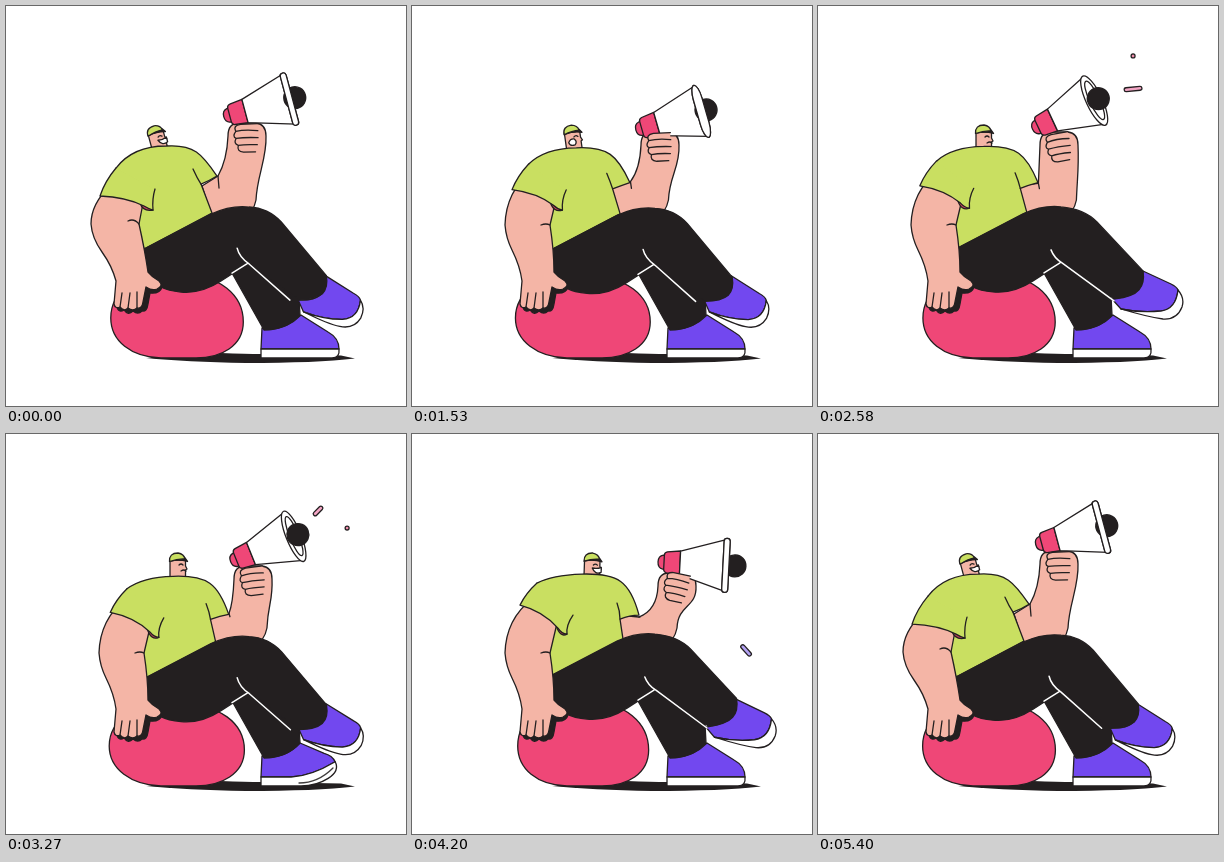
These frames come from a looping animation (400 px wide and 400 px high, 5.43 s). An HTML page:

```html
<!DOCTYPE html>
<html lang="en">
<head>
<meta charset="utf-8">
<title>Megaphone</title>
<style>
html, body { margin: 0; height: 100%; overflow: hidden; background: #fff; }
svg { display: block; width: 100%; height: 100%; }
path, rect, ellipse, circle { stroke: #231f20; stroke-width: 1.3; stroke-linejoin: round; stroke-linecap: round; }
.ink { fill: #231f20; }
.skin { fill: #f4b5a6; }
.green { fill: #c9df61; }
.pink { fill: #ef4777; }
.purple { fill: #7248ef; }
.white { fill: #fff; }
.line { fill: none; }
#shadow { stroke: none; }
#crease { stroke: #fff; stroke-width: 1.5; }
</style>
</head>
<body>
<svg viewBox="0 0 400 400">
  <path id="shadow" class="ink" d="M140 352L215 347Q240 348 255 348L335 349.500L349 352.500Q310 357 240 357Q180 356 140 352Z"/>
  <path id="ball" class="pink"/>
  <path id="shoe" class="purple"/>
  <path id="sole" class="white"/>
  <path id="soleLine" class="line" d="M293 349Q312 349 327 334"/>
  <path class="ink" d="M226 267L246 252L293 290L294 309Q280 324 258 324Z"/>
  <path id="farArm" class="skin"/>
  <path id="elbow" class="line"/>
  <g id="horn">
    <path class="pink" d="M-14-7H-17Q-22-6-22 0Q-22 6-17 7H-14Z"/>
    <path class="pink" d="M0-12L-13-10.500Q-16-10-16-7V7Q-16 10-13 10.500L0 12Z"/>
    <path class="white" d="M0-12L46-26V26L0 12Z"/>
    <rect id="rim" class="white"/>
    <ellipse id="mouthRing" class="white" cx="46.500" ry="21"/>
    <circle id="core" class="ink" r="11"/>
    <rect id="frontRim" class="white"/>
  </g>
  <path id="fist" class="skin" d="M9-12H-8Q-16-11-13-5Q-17 0-13 2Q-16 7-11 9Q-13 15-6 16H6M-13-5Q-4-7 9-5M-13 2Q-4 1 9 2M-11 9Q-4 8 8 9"/>
  <g id="head">
    <path class="skin" d="M-8 4V-16H7.500V-10L9-7L7.500-6V4Z"/>
    <path class="line" d="M1-11Q3-13 5-11"/>
    <path id="lips"/>
    <path class="ink" d="M-7-15Q1-17 9.500-14.500L7-18Z"/>
    <path class="green" d="M-8.500-14.500Q-9-23 0-23Q6-22 7-17Q0-17.500-8.500-14.500Z"/>
  </g>
  <path id="torso" class="green"/>
  <path id="pit" class="line"/>
  <path id="foot" class="purple"/>
  <path id="footSole" class="white"/>
  <path id="thigh" class="ink"/>
  <path id="crease" class="line"/>
  <path id="handShade" class="ink"/>
  <path id="arm" class="skin"/>
  <path id="armLine" class="line"/>
  <path id="lining" fill="#c4455c"/>
  <path id="sleeve" class="green"/>
  <g id="sparks"></g>
</svg>
<script>
const LOOP = 5430, STEP = 1810;
const $ = id => document.getElementById(id);
const set = (id, attrs) => { for (const k in attrs) $(id).setAttribute(k, attrs[k]); };
const draw = (id, d) => set(id, { d });
const clamp = x => Math.max(0, Math.min(1, x));
const ease = (t, a, b) => { const k = clamp((t - a) / (b - a)); return k * k * (3 - 2 * k); };
const wave = (t, peak, period) => Math.cos(2 * Math.PI * (t - peak) / period);
const NUM = /-?\d+(\.\d+)?/g;

// Blends two paths that share the same commands.
function mix(a, b, k) {
  const to = b.match(NUM);
  let i = 0;
  return a.replace(NUM, x => (x * (1 - k) + to[i++] * k).toFixed(2));
}

// time, lean, fist x y, horn x y, horn angle, rim width, head x, head angle
const poses = [
  [0, 0, 243, 130, 239, 105, -15, 3, 154, -15],
  [300, .08, 242, 130, 237, 102.5, -16, 3, 154.5, -12],
  [690, .22, 242, 134, 235.5, 107, -16.5, 3, 156, -7],
  [1530, .43, 250, 139, 245, 118, -16, 4.4, 162.5, -8],
  [2150, .5, 243, 136, 234, 111, -25, 7, 164.5, -2],
  [2580, .56, 243, 139, 234.5, 114, -25, 8, 166, 0],
  [3270, .73, 249, 145, 245, 119.5, -22, 7.5, 172, 0],
  [4200, 1, 267, 152, 268, 129, 3, 3, 180, 2],
  [4600, .35, 252, 142, 250, 118, -8, 3, 164, -8],
  [5000, 0, 243, 131, 239, 106, -15, 3, 154, -15]
];
const count = poses.length;
const keyAt = (i, c) => {
  const n = (i + count) % count;
  return poses[n][c] + (c ? 0 : LOOP * Math.floor(i / count));
};
const slope = (i, c) => (keyAt(i + 1, c) - keyAt(i, c)) / (keyAt(i + 1, 0) - keyAt(i, 0));
const tangent = (i, c) => {
  const a = slope(i - 1, c), b = slope(i, c);
  return a * b <= 0 ? 0 : 2 * a * b / (a + b);
};
// Smooth curve through the poses without overshoot.
function poseAt(t) {
  let i = count - 1;
  while (poses[i][0] > t) i--;
  const span = keyAt(i + 1, 0) - keyAt(i, 0), k = (t - keyAt(i, 0)) / span;
  const s = k * k * (3 - 2 * k);
  return poses[i].map((v, c) => v + (keyAt(i + 1, c) - v) * s
    + span * (k * (1 - k) ** 2 * tangent(i, c) - k * k * (1 - k) * tangent(i + 1, c)));
}

const TORSO = [
  'M110 162Q127 140 160 140C188 138 196 148 211 170Q203 175 195 178L206 207L138 243L126 200Z',
  'M125 150Q140 142 170 141C206 140 218 148 227 182Q218 182 208 186L211 206L139 243L130 200Z'];
const PIT = ['M187 163Q191 172 195 178', 'M205 170Q208 178 208 186'];
const SLEEVE = [
  'M110 162Q99 175 94 190Q120 191 138 200Q143 203 147 204Q146 193 149 183',
  'M125 150Q114 160 108 172Q131 178 146 195Q150 201 155 201Q154 192 161 182'];
const LINING = ['M134 197Q137 206 147 204Z', 'M144 192Q148 205 155 201Z'];
const ARM = [
  'M104 180Q85 198 85 218Q86 232 96 246Q106 260 110 275L108 298Q109 303 114 301Q118 306 122 302Q127 306 131 302Q136 303 137 296L140 281Q146 285 151 283Q158 280 153 275Q146 271 142 266Q139 245 133 218L138 192',
  'M106 178Q84 198 84 216Q87 236 97 248Q108 260 112 274L102 290Q101 295 107 294Q109 300 115 296Q118 302 125 298Q130 301 134 293L140 281Q146 285 151 283Q158 280 153 275Q146 271 142 266Q139 245 133 219L140 192',
  'M120 165Q94 185 93 219Q94 232 100 244Q108 260 110 275L108 298Q109 303 114 301Q118 306 122 302Q127 306 131 302Q136 303 137 296L140 281Q146 285 151 283Q158 280 153 275Q146 271 142 266Q142 245 138 219L146 185'];
const ARM_LINE = [
  'M116 287L114 301M124 287L122 302M131 286L131 302M122 215Q128 212 133 218',
  'M118 286L107 294M125 287L115 296M132 287L125 298M122 215Q128 212 133 219',
  'M116 287L114 301M124 287L122 302M131 286L131 302M129 219Q134 217 138 219'];
const SHADE = [
  'M110 298Q112 308 118 304Q122 310 127 305Q132 309 136 305Q141 306 142 298L144 287Q154 288 156 281L140 275Z',
  'M104 292Q110 303 116 299Q120 305 126 302Q131 305 136 301Q140 300 142 296L145 287Q154 288 156 281L140 275Z'];
const SHOE = [
  'M256 322Q278 326 295 309L322 326Q333 332 333 343Q310 343 290 343L255 343Z',
  'M256 322Q278 326 294 309L318 319Q326 321 329 327Q305 342 285 343L255 343Z'];
const SOLE = [
  'M255 343L290 343Q310 343 333 343Q334 352 326 352Q310 352 295 352L255 352Z',
  'M255 343L285 343Q305 342 329 327Q334 336 322 344Q310 352 295 352L255 352Z'];
const FOOT = [
  'M319 270L347 288Q353 291 354 295Q352 313 336 314Q318 314 297 306L292 294Q322 297 319 270Z',
  'M325 265L353 278Q359 281 360 284Q358 303 343 305Q322 307 303 303L294 293Q325 289 325 265Z'];
const FOOT_SOLE = [
  'M297 306Q318 314 336 314Q352 313 354 295Q359 303 354 313Q347 324 333 321Q322 319 297 306Z',
  'M303 303Q322 307 343 305Q358 303 360 284Q367 292 364 301Q359 314 345 313Q330 311 303 303Z'];
const THIGH = [
  'M138 243L205 208Q225 199 243 201Q262 202 275 216L320 270Q322 282 316 288Q309 294 293 294L243 257L215 275Q195 288 175 286Q150 284 140 268Z',
  'M138 243L205 208Q225 199 243 201Q266 203 279 216L325 265Q327 277 321 284Q315 291 297 293L243 257L215 275Q195 288 175 286Q150 284 140 268Z'];
const CREASE = [
  'M226 267L242 257M231 242Q233 251 243 258L283 294',
  'M226 267L242 257M233 244Q236 252 244 257L296 295'];
const LIPS = {
  grin: ['M0-8Q5-7 9-9V-4Q3-1 0-8Z', '#fff'],
  open: ['M-5-6Q-3-10 1-9Q4-6 1-3Q-4-2-5-6Z', '#fff'],
  shut: ['M3-5Q6-7 8-5', 'none']
};

// time seen, place seen, start, fall, length, angle, colour
const SPARKS = [
  [2580, 315, 50, 288, 88, 14, 0, 0, '#f08cab'],
  [2580, 315, 83, 288, 91, 6, 14, -6, '#f3a5c4'],
  [3270, 312, 77, 295, 97, 8, 8, -45, '#f3a5c4'],
  [3270, 341, 94, 296, 100, 14, 0, 0, '#f08cab'],
  [3720, 333, 58, 302, 106, 20, 0, 0, '#f08cab'],
  [4200, 334, 216, 306, 118, 60, 10, 48, '#b3a2f3']
];
const make = (parent, tag) => parent.appendChild(document.createElementNS('http://www.w3.org/2000/svg', tag));
const dots = SPARKS.map(([, , , , , , len, angle, fill]) => {
  const g = make($('sparks'), 'g'), r = make(g, 'rect');
  const attrs = { x: -len / 2 - 2, y: -2, width: len + 4, height: 4, rx: 2, fill, transform: `rotate(${angle})` };
  for (const k in attrs) r.setAttribute(k, attrs[k]);
  return g;
});

// The ball squashes and the body sinks with it.
function drawBounce(t) {
  const w = 1.5 * wave(t, 400, STEP), l = 104.5 + w, r = 237.5 - w * .7;
  draw('ball', `M${l} 312C${l} 285 130 ${268 - w} 170 ${268 - w}C215 ${268 - w} ${r} 290 ${r} 316C${r} 340 215 352 190 352L155 352C125 351 ${l} 335 ${l} 312Z`);
  for (const id of ['torso', 'pit', 'sleeve', 'lining', 'thigh', 'crease'])
    set(id, { transform: `translate(0 ${.3 - w})` });
}

function drawLegs(t) {
  const swing = (1 + wave(t, 750, STEP)) / 2;
  draw('foot', mix(...FOOT, swing));
  draw('footSole', mix(...FOOT_SOLE, swing));
  draw('thigh', mix(...THIGH, swing));
  draw('crease', mix(...CREASE, swing));
  const tap = Math.max(0, wave(t, 620, LOOP / 4));
  draw('shoe', mix(...SHOE, tap));
  draw('sole', mix(...SOLE, tap));
  set('soleLine', { opacity: clamp(tap * 3 - 2) });
}

function drawNearArm(t) {
  const bend = ease(t, 1150, 1500) - ease(t, 4200, 4500);
  const spread = ease(t, 300, 650) - ease(t, 750, 1100);
  const limb = ([rest, lifted, forward]) => mix(mix(rest, lifted, spread), forward, bend);
  draw('arm', limb(ARM));
  draw('armLine', limb(ARM_LINE));
  draw('handShade', mix(...SHADE, spread));
}

function drawUpper(t) {
  const [, lean, x, y, hx, hy, angle, rim, headX, headAngle] = poseAt(t);
  draw('torso', mix(...TORSO, lean));
  draw('pit', mix(...PIT, lean));
  draw('sleeve', mix(...SLEEVE, lean));
  draw('lining', mix(...LINING, lean));

  const cx = 212 + 15 * lean, cy = 170 + 13 * lean, ex = 251 + 15 * lean;
  draw('farArm', `M196 180L${cx} ${cy}Q${x - 22} ${y + 24} ${x - 21} ${y}Q${x - 21} ${y - 13} ${x - 10} ${y - 13}L${x + 7} ${y - 13}Q${x + 17} ${y - 12} ${x + 17} ${y}C${x + 18} ${y + 22} ${ex} 170 ${ex - 1} 194Q${ex - 2} 200 ${ex - 6} 206L240 215L206 212Z`);
  draw('elbow', `M${cx} ${cy}l1 ${12 * (1 - lean)}`);
  set('fist', { transform: `translate(${x} ${y}) rotate(${angle * .8 + 10})` });

  set('horn', { transform: `translate(${hx} ${hy}) rotate(${angle})` });
  const turned = clamp((rim - 3) / 3);
  const hoop = { x: 46 - rim, y: -27, width: 2 * rim, height: 54, rx: rim, ry: 3 + 24 * turned };
  set('rim', hoop);
  set('frontRim', { ...hoop, visibility: rim < 5 ? 'visible' : 'hidden' });
  set('mouthRing', { rx: Math.max(0, rim - 3), visibility: rim < 5 ? 'hidden' : 'visible' });
  set('core', { cx: 51.5 + 3.5 * clamp((angle + 15) / 18) - turned });

  set('head', { transform: `translate(${headX} 142) rotate(${headAngle})` });
  const [d, fill] = LIPS[t < 1250 || t > 3800 ? 'grin' : t < 1950 ? 'open' : 'shut'];
  set('lips', { d, fill });
}

function drawSparks(t) {
  SPARKS.forEach(([seen, x, y, x0, y0, fall], i) => {
    const u = (t - seen + 400) / 400;
    const size = Math.max(0, Math.min(1, u * 3, (1.25 - u) * 4));
    const px = x0 + (x - x0) * u, py = y0 + (y - y0) * u + fall * u * (u - 1);
    dots[i].setAttribute('transform', `translate(${px} ${py}) scale(${size})`);
    dots[i].setAttribute('visibility', size ? 'visible' : 'hidden');
  });
}

const start = performance.now();
function frame() {
  const t = (performance.now() - start) % LOOP;
  drawBounce(t);
  drawLegs(t);
  drawNearArm(t);
  drawUpper(t);
  drawSparks(t);
  requestAnimationFrame(frame);
}
frame();
</script>
</body>
</html>
```
